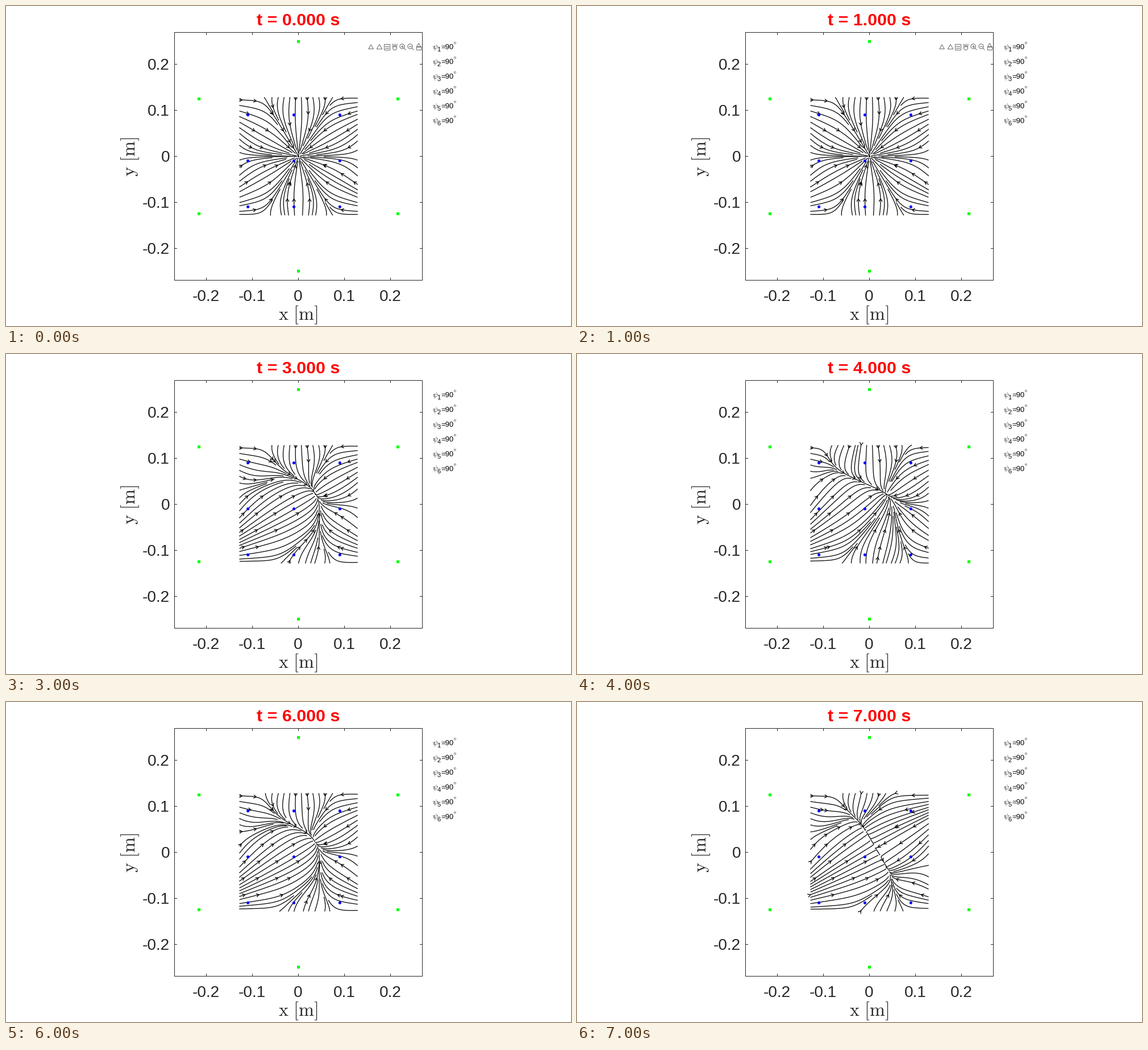
A matplotlib script that plays this animation: 994x563 px, repeating every 8000 ms.

```python
import numpy as np
import matplotlib.pyplot as plt
from matplotlib.animation import FuncAnimation
from matplotlib.collections import LineCollection
from matplotlib.patches import Circle, Rectangle, RegularPolygon

W, H, DPI = 994, 563, 64
PT = 72 / DPI                        # points per pixel
CX, CY, SCALE = 514.6, 264.4, 808.5  # plot origin and pixels per metre
REACH = 0.27                         # half side of the plot frame
HALF = 0.129                         # half side of the streamline area
SEEDS, CELLS, ARROWS = 20, 80, 7     # grids for starts, spacing, arrowheads
STEP, STEPS = 0.0007, 480
INK, GREY = "#262626", "#6a6a6a"

plt.rcParams["mathtext.fontset"] = "cm"
plt.rcParams["font.family"] = "Liberation Sans"

BEARINGS = range(30, 390, 60)
COILS = 0.25 * np.array([(np.cos(a), np.sin(a)) for a in np.radians(BEARINGS)])

# Second -> coil bearing -> strength; all other coils push with strength 1
PUSHES = {
    3: {210: 13},
    4: {210: 13, 150: 0.2, 90: 2, 270: 4},
    6: {210: 13, 150: 0.65},
    7: {210: 24, 30: 9.4},
}


def to_px(p):
    p = np.asarray(p, float)
    return np.stack([CX + SCALE * p[..., 0], CY - SCALE * p[..., 1]], axis=-1)


def unit(v):
    return v / (np.linalg.norm(v, axis=-1, keepdims=True) + 1e-12)


def direction(pos, strength):
    """Unit force direction; each coil repels with the 7th power of distance."""
    d = pos[:, None, :] - COILS
    w = strength * ((d ** 2).sum(2) / 0.25 ** 2) ** -4
    return unit((d * w[..., None]).sum(1))


def trace(start, strength, sign):
    track = [start]
    for _ in range(STEPS):
        p = track[-1]
        mid = p + sign * STEP / 2 * direction(p, strength)
        track.append(p + sign * STEP * direction(mid, strength))
    return np.array(track)


def cells(path, n):
    ij = ((path + HALF) / (2 * HALF) * n).astype(int)
    return [tuple(c) for c in ij.tolist()]


def arrowhead(tip, heading):
    u = unit(heading)
    side = 0.0036 * np.array([-u[1], u[0]])
    back = tip - 0.006 * u
    return np.array([back + side, tip, back - side])


def streams(push):
    """Evenly spaced streamlines with arrowheads, in pixels."""
    strength = np.array([push.get(b, 1) for b in BEARINGS])
    axis = ((np.arange(SEEDS) + 0.5) / SEEDS * 2 - 1) * HALF
    start = np.array([(x, y) for y in axis[::-1] for x in axis])
    tracks = [(s, trace(start, strength, s)) for s in (1, -1)]
    seeded, taken, marked = set(), set(), set()
    lines = []
    for k, seed in enumerate(cells(start, SEEDS)):
        if seed in seeded:
            continue
        for sign, track in tracks:
            path = track[:, k]
            outside = np.abs(path).max(1) >= HALF
            end = int(outside.argmax()) if outside.any() else STEPS
            near, fine, coarse = (cells(path[:end], n)
                                  for n in (SEEDS, CELLS, ARROWS))
            last = fine[0]
            taken.add(last)
            stop = end
            for i in range(end):
                if fine[i] != last:
                    if fine[i] in taken:
                        stop = i
                        break
                    last = fine[i]
                    taken.add(last)
                seeded.add(near[i])
                if coarse[i] not in marked:
                    marked.add(coarse[i])
                    heading = sign * (path[i + 1] - path[i])
                    lines.append(to_px(arrowhead(path[i], heading)))
            if stop > 1:
                lines.append(to_px(path[:stop]))
    return lines


fig = plt.figure(figsize=(W / DPI, H / DPI), dpi=DPI, facecolor="white")
ax = fig.add_axes([0, 0, 1, 1])
ax.set_xlim(0, W)
ax.set_ylim(H, 0)
ax.axis("off")


def line(x0, y0, x1, y1, color=INK):
    return ax.plot([x0, x1], [y0, y1], color=color, lw=PT)[0]


def outline(shape, color=INK, width=1.0):
    shape.set(fill=False, edgecolor=color, linewidth=width * PT)
    return ax.add_patch(shape)


def text(x, y, s, size, color=INK, ha="center", **kw):
    return ax.text(x, y, s, fontsize=size * PT, color=color, ha=ha,
                   va="baseline", **kw)


def draw_frame():
    left, top = np.floor(to_px((-REACH, REACH)))
    right, bottom = np.floor(to_px((REACH, -REACH)))
    outline(Rectangle((left, top), right - left, bottom - top))
    for v in np.arange(-2, 3) / 10:
        x, y = np.floor(to_px((v, v)))
        for edge, inward in ((top, 4), (bottom, -4)):
            line(x, edge, x, edge + inward)
        for edge, inward in ((left, 4), (right, -4)):
            line(edge, y, edge + inward, y)
        text(x, 519, f"{v:g}", 28)
        text(288, y + 10, f"{v:g}", 28, ha="right")
    text(513.5, 552, r"$\mathrm{x\ [m]}$", 32.3)
    text(227, 265, r"$\mathrm{y\ [m]}$", 32.3, rotation=90,
         rotation_mode="anchor")


def draw_readouts():
    for i in range(6):
        y = 76.5 + 25.9 * i
        text(750, y - 0.5, r"$\psi$", 13.5, "black", "left")
        text(758.5, y + 4, str(i + 1), 11, "black", "left")
        text(765, y, "=90", 13, "black", "left")
        outline(Circle((789.8, y - 11.5), 1.5), "#333333", 0.6)


def draw_objects():
    for x, y in to_px(COILS):
        ax.add_patch(Rectangle((x - 2.5, y - 2.5), 5, 5, fc="#00ff00", lw=0))
    for gx in (-0.11, -0.01, 0.09):
        for gy in (-0.11, -0.01, 0.09):
            ax.add_patch(Circle(to_px((gx, gy)), 2.6, fc="#0000ff", lw=0,
                                zorder=4))


def draw_toolbar():
    """Seven small grey icons, evenly spaced."""
    xs = 642 + 14 * np.arange(7)
    y = 72
    parts = [outline(s, GREY) for s in (
        RegularPolygon((xs[0], y + 1), 3, radius=5, orientation=np.pi),
        RegularPolygon((xs[1] + 1, y + 1), 3, radius=5.5, orientation=np.pi),
        Rectangle((xs[2] - 5, y - 5), 10, 10),
        Circle((xs[3], y + 2), 3.5),
        Circle((xs[4] - 1, y - 1), 4.2),
        Circle((xs[5] - 1, y - 1), 4.2),
        Rectangle((xs[6] - 4, y - 1), 8, 6),
        RegularPolygon((xs[6], y - 2), 3, radius=4.5, orientation=np.pi),
    )]
    for dy in (-1, 2):
        parts.append(line(xs[2] - 3, y + dy, xs[2] + 3, y + dy, GREY))
    for dx in np.linspace(-3, 3, 4):
        parts.append(line(xs[3] + dx, y, xs[3] + 1.4 * dx, y - 5, GREY))
    for x in xs[4:6]:
        parts.append(line(x + 2, y + 2, x + 5, y + 5, GREY))
        parts.append(line(x - 3, y - 1, x + 1, y - 1, GREY))
    parts.append(line(xs[4] - 1, y - 3, xs[4] - 1, y + 1, GREY))
    return parts


def add_field(push):
    group = LineCollection(streams(push), colors="black",
                           linewidths=1.25 * PT, zorder=3)
    return ax.add_collection(group, autolim=False)


draw_frame()
draw_readouts()
draw_objects()
icons = draw_toolbar()
title = text(514, 33.5, "", 30.4, color="#ff0000", weight="bold")
rest = add_field({})
fields = {k: add_field(push) for k, push in PUSHES.items()}


def draw(second):
    title.set_text(f"t = {second:.3f} s")
    for part in icons:
        part.set_visible(second < 2)
    rest.set_visible(second not in fields)
    for k, group in fields.items():
        group.set_visible(k == second)
    return []


anim = FuncAnimation(fig, draw, frames=8, interval=1000, repeat=True,
                     repeat_delay=0, blit=False)
plt.show()
```
